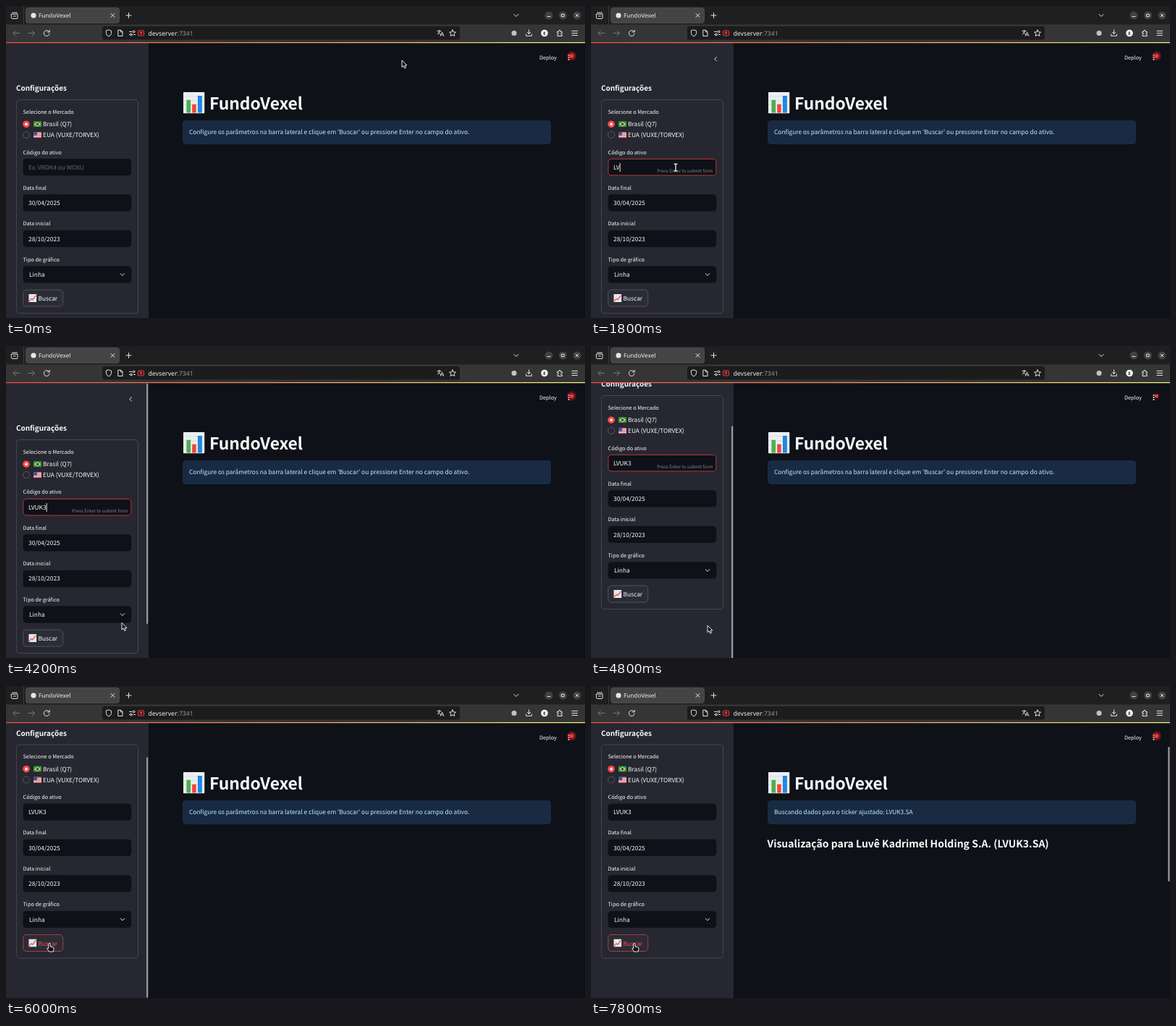
Write an HTML page that moves like this. It is 800 px wide and 431 px high and loops after 8 s.

```html
<!DOCTYPE html>
<html lang="pt">
<head>
<meta charset="utf-8">
<title>FundoVexel</title>
<style>
html, body { margin: 0; width: 100%; height: 100%; overflow: hidden; background: #0e1117; }
svg { display: block; width: 100%; height: 100%; }
text { font: 8.37px "Noto Sans CJK JP", "Noto Sans CJK SC", "Noto Sans CJK", "Noto Sans", sans-serif; font-variant-numeric: lining-nums tabular-nums; fill: #fafafa; white-space: pre; text-rendering: geometricPrecision; }
.label { font-size: 7.3px; }
.hint { font-size: 6.25px; fill: #85868c; text-anchor: end; }
.dim { fill: #66686f; }
.h1 { font-size: 22.9px; font-weight: 700; letter-spacing: -.13px; }
.h2 { font-size: 9.95px; font-weight: 700; }
.h3 { font-size: 14px; font-weight: 700; }
.metric { font-size: 18.75px; }
.info { fill: #c7ebff; }
.ui { font: 8.2px "Noto Sans", sans-serif; fill: #f0f0f0; }
.url { font-size: 8.7px; }
.line { fill: none; stroke: #e4e4e4; stroke-width: 1; stroke-linecap: round; stroke-linejoin: round; }
.off { stroke: #777; }
.field { fill: #0e1117; }
</style>
</head>
<body>
<svg viewBox="0 0 800 431" preserveAspectRatio="none">
  <defs>
    <linearGradient id="strip"><stop stop-color="#ff4b4b"/><stop offset="1" stop-color="#fffd80"/></linearGradient>
    <radialGradient id="halo">
      <stop offset=".25" stop-color="#ff2a2a" stop-opacity=".75"/>
      <stop offset="1" stop-color="#ff2a2a" stop-opacity="0"/>
    </radialGradient>
    <clipPath id="page"><rect y="51" width="197" height="380"/></clipPath>
    <symbol id="bars" viewBox="0 0 30 30">
      <rect width="30" height="30" rx="1" fill="#eceff1"/>
      <path d="M0 6H30M0 12H30M0 18H30M0 24H30" stroke="#cfd8dc" stroke-width=".8"/>
      <path d="M4.500 11H10.300V29H4.500z" fill="#4caf50"/>
      <path d="M12.400 17H18V29H12.400z" fill="#f44336"/>
      <path d="M20.300 5H26.300V29H20.300z" fill="#1e88e5"/>
    </symbol>
    <symbol id="trend" viewBox="0 0 30 30">
      <rect width="30" height="30" rx="1" fill="#eceff1"/>
      <path d="M0 8H30M0 15H30M0 22H30M8 0V30M15 0V30M22 0V30" stroke="#b6c4cb" stroke-width=".8"/>
      <path d="M2 27L10 17L15 21L27 5" fill="none" stroke="#f44336" stroke-width="3"/>
    </symbol>
  </defs>

  <!-- browser -->
  <rect width="800" height="50" fill="#353535"/>
  <rect width="800" height="25.500" fill="#1f1f1f"/>
  <path d="M24.500 0V25" stroke="#3c3c3c"/>
  <rect x="27.500" y="2.500" width="129" height="21" rx="3" fill="#444" stroke="#575757" stroke-width=".7"/>
  <circle cx="38" cy="13" r="3.600" fill="#e6e6e6"/>
  <text class="ui" x="45" y="16">FundoVexel</text>
  <g class="line">
    <path d="M8.500 9.200H15.500M7.500 11.200H16V16.500Q16 17.500 15 17.500H8.500Q7.500 17.500 7.500 16.500ZM10.300 14H13.300"/>
    <path d="M145 10.500l5 5m0-5l-5 5M166 13h7m-3.500-3.500v7M702 11.500l3 3 3-3"/>
    <path class="off" d="M18.500 37.500H10m3.500-3.500L10 37.500l3.500 3.500M31 37.500h8.500m-3.500-3.500l3.500 3.500-3.500 3.500"/>
    <path d="M59.500 35.500a3.900 3.900 0 1 0 .6 2.800M60.200 33.300v2.700h-2.700"/>
  </g>
  <rect x="133" y="28" width="494" height="18.500" rx="3" fill="#1c1c1c"/>
  <g class="line">
    <path d="M142 33l3.600 1.300v3q0 3-3.600 4.700q-3.600-1.700-3.600-4.700v-3z"/>
    <path d="M155.200 33.300h3.600l2.200 2.200v6h-5.800zM158.500 33.500v2.300h2.300"/>
    <path d="M170.500 35.500h3.500M176.500 39.500h2M170.500 39.500h1"/>
    <circle cx="176.500" cy="35.500" r="1.400"/><circle cx="173" cy="39.500" r="1.400"/>
    <path d="M596 34.500h5m-2.500-1.200v1.200m1.500 0q-.8 3-3.800 4.500m1-3q1 2 3 3M600.200 41.500l2.300-5.500 2.300 5.500m-3.800-1.700h3" stroke-width=".9"/>
    <path d="M617 33l1.300 2.900 3.200.3-2.400 2.100.7 3.200-2.800-1.700-2.800 1.700.7-3.200-2.400-2.100 3.200-.3z"/>
    <path d="M722.500 33v5.500m-2.300-2.200l2.300 2.300 2.300-2.300M718.700 39v2.300h7.600V39"/>
    <path d="M762 35.500h1.700q-.5-2.200 1.200-2.200t1.200 2.200h2.200v2q-1.800-.3-1.800 1t1.800 1v2h-6.300v-2.200q1.600.2 1.600-1t-1.600-1z"/>
    <path d="M782 34.500h7.500m-7.500 3h7.500m-7.500 3h7.500"/>
  </g>
  <rect x="182.500" y="34" width="8" height="7" rx="1" fill="#401a1c" stroke="#e5383b"/>
  <path d="M186.500 35.700v3.600m-1.600-1.900l1.600-1.700 1.600 1.700" fill="none" stroke="#ff5357"/>
  <text class="ui url" x="196.500" y="40.700">devserver<tspan fill="#969696">:7341</tspan></text>
  <circle cx="702" cy="37.500" r="3.500" fill="#c4c4c4"/>
  <circle cx="744" cy="37.500" r="4.800" fill="#f4f4f4"/>
  <text class="ui" x="744" y="39.800" text-anchor="middle" style="font-size:6px;font-weight:700;fill:#222">E</text>
  <g fill="#414141"><circle cx="750" cy="13" r="5.600"/><circle cx="769.500" cy="13" r="5.600"/><circle cx="789" cy="13" r="5.600"/></g>
  <path class="line" stroke-width=".9" d="M748 14.500h4M767.800 11.300h3.400v3.400h-3.400zM787.200 11.200l3.600 3.600m0-3.600l-3.600 3.600"/>

  <!-- main area -->
  <rect y="50" width="800" height="381" fill="#0e1117"/>
  <text class="label" x="737" y="73.800">Deploy</text>
  <g fill="#fafafa"><circle cx="777.500" cy="68" r="1"/><circle cx="777.500" cy="71" r="1"/><circle cx="777.500" cy="74" r="1"/></g>
  <circle id="glow" cx="781.500" cy="69" r="7.500" fill="url(#halo)"/>
  <circle cx="781.500" cy="69" r="2.600" fill="#f03a3a"/>
  <use href="#bars" x="245" y="119" width="29.500" height="29.500"/>
  <text class="h1" x="281" y="143">FundoVexel</text>
  <rect x="244" y="158" width="509" height="33" rx="4.500" fill="#182b43"/>
  <text class="info" id="info" x="253" y="177.300"></text>
  <text class="h3" id="title" x="243.500" y="223">Visualização para Luvê Kadrimel Holding S.A. (LVUK3.SA)</text>
  <g id="results">
    <rect x="244" y="236" width="509" height="26" rx="4.500" fill="#26272c"/>
    <text class="h3" x="243.500" y="294">Retornos percentuais no período</text>
    <g id="metrics"></g>
  </g>
  <rect id="mainBar" x="797.300" y="84" width="2.200" rx="1.100" fill="#9a9b9f"/>

  <!-- sidebar -->
  <rect y="50" width="197" height="381" fill="#262730"/>
  <g clip-path="url(#page)">
    <g id="side">
      <path id="fold" class="line" stroke-width="1.400" d="M173.500 70.500L170.800 73.200L173.500 75.900"/>
      <text class="h2" x="14" y="117">Configurações</text>
      <rect x="14.300" y="129.500" width="168.200" height="295" rx="4.500" fill="none" stroke="#505159" stroke-width=".8"/>
      <text class="label" x="23.500" y="148.800">Selecione o Mercado</text>
      <circle cx="28" cy="163.200" r="4.800" fill="#ff4b4b"/><circle cx="28" cy="163.200" r="1.800" fill="#fff"/>
      <circle cx="28" cy="178" r="4.500" fill="#262730" stroke="#63646b" stroke-width=".8"/>
      <rect x="38" y="159.300" width="11" height="7.800" rx=".8" fill="#2e9e4a"/>
      <path d="M39 163.200l4.500-3 4.500 3-4.500 3z" fill="#fdd835"/><circle cx="43.500" cy="163.200" r="1.700" fill="#283593"/>
      <rect x="38" y="174.300" width="11" height="7.800" rx=".8" fill="#f0f0f0"/>
      <path d="M38 175h11m-11 2.200h11m-11 2.200h11m-11 2.200h11" stroke="#d9404c"/>
      <rect x="38" y="174.300" width="5" height="4.200" fill="#37509b"/>
      <text x="51" y="166.300">Brasil (Q7)</text>
      <text x="51" y="181.300">EUA (VUXE/TORVEX)</text>
      <g id="fields"></g>
      <rect id="focus" x="23.850" y="211.350" width="149" height="22.600" rx="4.200" fill="none" stroke="#ff4b4b" stroke-width=".7"/>
      <text id="ticker" x="31" y="225.800"></text>
      <text id="hint" class="hint" x="168.500" y="230">Press Enter to submit form</text>
      <path id="caret" d="M0 217V229" stroke="#fafafa" stroke-width=".9"/>
      <path class="line" stroke-width="1.500" d="M158.300 369.700L161 372.400L163.700 369.700"/>
      <rect id="button" x="23.700" y="392" width="55" height="23" rx="4.500" fill="#2b2c36" stroke-width=".9"/>
      <use href="#trend" x="31.300" y="398" width="11" height="11"/>
      <text id="search" x="44.500" y="407">Buscar</text>
    </g>
    <rect id="sideBar" x="194" width="2.200" height="332" rx="1.100" fill="#98989c"/>
  </g>
  <rect y="50" width="800" height="1.200" fill="url(#strip)"/>

  <!-- pointers -->
  <g id="pointer">
    <path id="arrow" d="M0 0V9.500L2.200 7.500L3.800 11L5.500 10.200L4 7H7Z" fill="#111" stroke="#fff" stroke-width=".9"/>
    <path id="beam" d="M-2.300-5Q0-5 0-3.500Q0-5 2.300-5M0-3.500V3.500M-2.300 5Q0 5 0 3.500Q0 5 2.300 5" fill="none" stroke="#eee" stroke-width="1.300"/>
    <path id="hand" d="M-1.300 0Q0-1.500 1 0V4L5 5Q6.200 5.300 6 7L5.300 11H-.3L-3.200 7Q-3.500 5.500-1.300 6.500Z" fill="#111" stroke="#fff" stroke-width=".9"/>
  </g>
</svg>
<script>
const LOOP = 8000, CODE = 'LVUK3';
const KEYS = [1500, 1800, 2100, 2500, 3100];
const FOCUS = 800, HOVER = 5450, CLICK = 5800, SEARCH = 6400, DONE = 6800, RELOAD = 7400;
const PATH = [[150, 547, 75], [780, 117, 223], [3700, 117, 223], [4250, 161, 386], [4900, 161, 386], [5550, 60, 356]];

const $ = id => document.getElementById(id);
const show = (id, on) => $(id).style.display = on ? '' : 'none';
const ease = (t, a, b) => {
  const p = Math.min(1, Math.max(0, (t - a) / (b - a)));
  return p * p * (3 - 2 * p);
};

$('fields').innerHTML = [
  ['Código do ativo', '', 211], ['Data final', '30/04/2025', 260.3],
  ['Data inicial', '28/10/2023', 309.7], ['Tipo de gráfico', 'Linha', 359.2]
].map(([label, value, y]) => `<text class="label" x="23.5" y="${y - 6.5}">${label}</text>
  <rect class="field" x="23.5" y="${y}" width="149.700" height="23.300" rx="4.500"/>
  <text x="${value === 'Linha' ? 32 : 31}" y="${y + 14.8}">${value}</text>`).join('');

$('metrics').innerHTML = [['30', '11.30'], ['90', '18.85'], ['365', '48.06']].map(([days, pct], i) =>
  `<text class="label" x="${243.5 + i * 173}" y="317.300">${days} dias</text>
   <text class="metric" x="${243.5 + i * 173}" y="342.800">${pct}%</text>`).join('');

function pointerAt(t) {
  let [, x, y] = PATH[0];
  for (let i = 1; i < PATH.length; i++) {
    const p = ease(t, PATH[i - 1][0], PATH[i][0]);
    x += (PATH[i][1] - PATH[i - 1][1]) * p;
    y += (PATH[i][2] - PATH[i - 1][2]) * p;
  }
  return [x, y];
}

function drawForm(t) {
  const typed = CODE.slice(0, KEYS.filter(k => k <= t).length);
  const focused = t >= FOCUS && t < CLICK;
  const ticker = $('ticker');
  ticker.textContent = typed || 'Ex: VRDK4 ou WOXU';
  ticker.setAttribute('class', typed ? '' : 'dim');
  show('focus', focused);
  show('hint', focused);

  const last = Math.max(FOCUS, ...KEYS.filter(k => k <= t));
  const caretX = 31.5 + (typed ? ticker.getComputedTextLength() : 0);
  $('caret').setAttribute('transform', `translate(${caretX})`);
  show('caret', focused && (t - last) % 1000 < 500);

  const hot = t >= HOVER, button = $('button');
  button.setAttribute('stroke', hot ? '#ff4b4b' : '#55565e');
  button.setAttribute('stroke-dasharray', t >= CLICK ? '1.6 .8' : 'none');
  $('search').style.fill = hot ? '#ff4b4b' : '';
}

function drawPage(t) {
  const scroll = t < CLICK ? 61 * ease(t, 4200, 4700) : 48.5;
  $('side').setAttribute('transform', `translate(0 ${-scroll})`);
  $('sideBar').setAttribute('y', 52 + scroll * .96);
  show('sideBar', (t >= 600 && t < 1600) || (t >= 4200 && t < SEARCH));

  $('info').textContent = t < SEARCH
    ? "Configure os parâmetros na barra lateral e clique em 'Buscar' ou pressione Enter no campo do ativo."
    : 'Buscando dados para o ticker ajustado: LVUK3.SA';
  show('title', t >= DONE);
  show('results', t >= DONE && t < RELOAD);
  show('mainBar', t >= DONE);
  $('mainBar').setAttribute('height', t < RELOAD ? 331 : 186);
  $('glow').setAttribute('opacity', (1 + Math.cos(t * Math.PI / 1000)) / 2);
}

function drawPointer(t) {
  const [x, y] = pointerAt(t);
  const shape = t >= HOVER ? 'hand' : t >= 740 && t < 2600 ? 'beam' : 'arrow';
  $('pointer').setAttribute('transform', `translate(${x} ${y})`);
  for (const id of ['arrow', 'beam', 'hand']) show(id, id === shape);
  show('fold', x < 197);
}

function render(t) {
  drawForm(t);
  drawPage(t);
  drawPointer(t);
}

const start = performance.now();
function tick() {
  render((performance.now() - start) % LOOP);
  requestAnimationFrame(tick);
}
tick();
</script>
</body>
</html>
```
